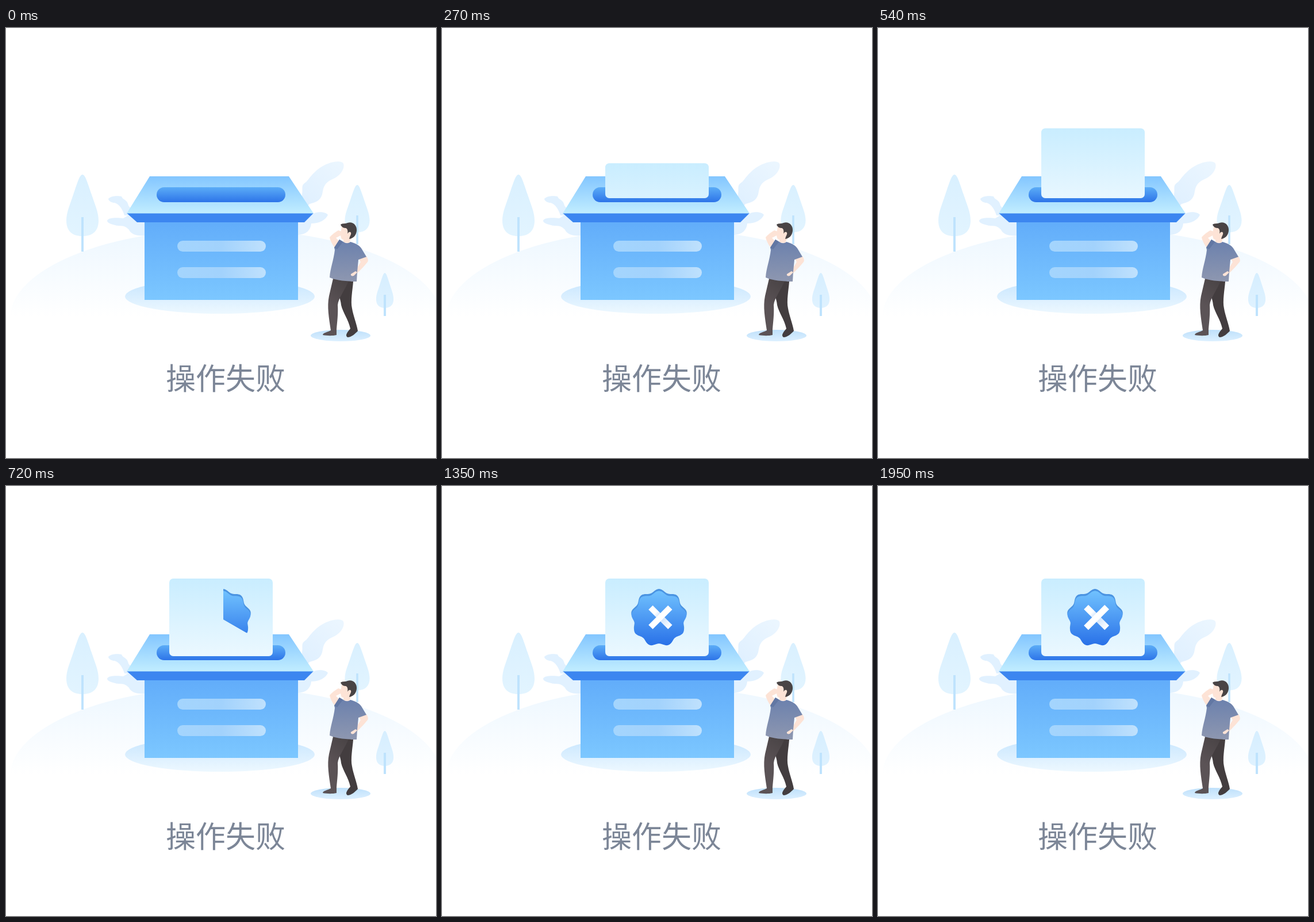
An HTML page with a canvas for the animation above (1.98 s loop, 748 by 748 pixels).

```html
<!DOCTYPE html>
<html lang="zh">
<head>
<meta charset="utf-8">
<title>操作失败</title>
<style>
html, body { margin: 0; width: 100%; height: 100%; overflow: hidden; background: #fff; }
canvas { display: block; width: 748px; height: 748px; }
</style>
</head>
<body>
<canvas id="stage" width="748" height="748"></canvas>
<script>
const ctx = document.getElementById('stage').getContext('2d');
const LOOP = 1980, STEP = 30;
const clamp = (v, a = 0, b = 1) => Math.min(b, Math.max(a, v));
const progress = (t, from, to) => clamp((t - from) / (to - from));

function grad(x0, y0, x1, y1, ...colors) {
  const g = ctx.createLinearGradient(x0, y0, x1, y1);
  colors.forEach((c, i) => g.addColorStop(i / (colors.length - 1), c));
  return g;
}
const down = (y0, y1, ...colors) => grad(0, y0, 0, y1, ...colors);

function shape(d, fill) {
  ctx.fillStyle = fill;
  ctx.fill(new Path2D(d));
}

function oval(x, y, rx, ry, fill) {
  ctx.fillStyle = fill;
  ctx.beginPath();
  ctx.ellipse(x, y, rx, ry, 0, 0, Math.PI * 2);
  ctx.fill();
}

function pill(x, y, w, h, r, fill) {
  ctx.fillStyle = fill;
  ctx.beginPath();
  ctx.roundRect(x, y, w, h, r);
  ctx.fill();
}

function tree(x, y, sx, sy, trunkTop, trunkEnd, trunkW, crown, trunk) {
  ctx.save();
  ctx.translate(x, y);
  ctx.scale(sx, sy);
  shape('M0 0C5 0 9 15 16 35C22 53 28 66 28 80C28 97 19 107 0 107' +
    'C-19 107-28 97-28 80C-28 66-22 53-16 35C-9 15-5 0 0 0Z', crown);
  ctx.restore();
  ctx.fillStyle = trunk;
  ctx.fillRect(x - trunkW / 2, trunkTop, trunkW, trunkEnd - trunkTop);
}

function scenery() {
  ctx.fillStyle = down(350, 502, '#edf7ff', '#ffffff');
  ctx.beginPath();
  ctx.ellipse(382, 505, 375, 155, 0, Math.PI, Math.PI * 2);
  ctx.fill();

  tree(133, 255, 1, 1, 329, 389, 4, down(0, 107, '#d9f0ff', '#e2f4ff'), '#bfe3fd');
  tree(611, 273, .77, .77, 326, 376, 3.5, down(0, 107, '#d9f0ff', '#e2f4ff'), '#bfe3fd');
  tree(659, 426, .54, .57, 464, 501, 4, down(0, 107, '#d6eeff', '#dff2ff'), '#bfe3fd');

  const leaf = '#e1f1ff';
  shape('M178 297C184 291 196 292 201 293C204 300 211 298 213 309L227 326H206' +
    'C202 312 194 304 187 304C182 303 178 300 178 297Z', leaf);
  shape('M176 335C178 329 196 330 204 331L214 325L241 330V361C230 362 218 360 214 351' +
    'C205 341 198 346 190 343C182 341 176 339 176 335Z', leaf);
  shape('M587 236C590 246 580 258 568 263C559 267 553 272 551 284C549 300 540 303 528 306' +
    'L515 320V290C517 278 512 274 522 268C528 262 538 244 560 236C572 231 585 231 587 236Z',
    grad(580, 235, 518, 300, '#ebf6ff', '#e0f0ff'));
  shape('M560 325C556 334 545 340 531 340C530 352 522 359 508 360V335L535 323' +
    'C540 319 556 319 560 325Z', leaf);
}

function box() {
  oval(372, 467, 165, 30, down(437, 497, '#c6e5fe', '#edf8ff'));
  ctx.fillStyle = down(338, 473, '#62adfa', '#7cc7ff');
  ctx.fillRect(241, 338, 267, 135);
  const bar = grad(298, 0, 452, 0, '#a4d5fd', '#a2d2fc', '#bfe1fd');
  pill(298, 370, 154, 19, 9.5, bar);
  pill(298, 416, 154, 19, 9.5, bar);
  shape('M210 322H535L519 338H228Z', '#3c86f0');
  shape('M250 258H492L535 322.5H210Z', down(258, 322, '#83c6ff', '#c1edff'));
  pill(262, 277, 224, 26, 13, down(277, 303, '#5bacf7', '#2d74e8'));
}

function man() {
  const skin = '#fde3d6';
  oval(582, 535, 52, 10, down(525, 545, '#bee0fb', '#dcf0ff'));
  // legs
  shape('M590 438L604 441C603 455 599 475 602 488C604 500 610 515 612 527' +
    'C607 532 601 538 594 538C590 535 592 531 599 523C596 508 586 495 583 482' +
    'C582 470 578 465 575 460Z', '#433d3f');
  shape('M569 436L596 440C590 455 578 470 577 482C578 497 576 512 575 524L575 534' +
    'C567 536 556 535 551 534C551 530 560 529 565 526C562 505 558 485 562 466Z',
    grad(590, 440, 562, 480, '#4a4446', '#5b5356'));
  // arms
  shape('M573 384C568 377 564 370 563 364C567 359 573 355 578 352L584 354L582 361' +
    'L574 365L582 374Z', skin);
  shape('M614 402L627 397C629 400 631 404 629 407C622 416 612 425 608 430' +
    'C605 432 602 432 600 430C599 427 604 425 608 422L617 407Z', skin);
  // head
  shape('M584 345L600 344L602 362L597 374L587 373L587 368C583 368 582 363 582 358Z', skin);
  shape('M582 342C586 339 590 341 594 339C604 336 611 344 610 353C609 361 604 366 597 367' +
    'C598 362 601 359 600 356C598 353 595 356 594 358C595 353 594 349 591 348' +
    'C588 348 584 347 582 342Z', '#494445');
  // shirt
  shape('M580 368L587 372C591 375 596 375 599 372C606 374 614 377 618 383L627 398' +
    'L613 403L611 424L610 441C594 441 574 439 563 434C564 418 570 404 572 386L571 382Z',
    down(368, 441, '#6a80ad', '#8e97b0'));
  shape('M580 368L586 372L576 385L571 382Z', '#6277a3');
  shape('M608 423L600 428C599 431 602 432 605 431L611 425Z', skin);
}

function wavy(x, y, r, fill) {
  ctx.beginPath();
  for (let i = 0; i < 360; i += 2) {
    const a = i * Math.PI / 180;
    const d = r + 2.7 * Math.cos(9 * a);
    ctx.lineTo(x + d * Math.sin(a), y - d * Math.cos(a));
  }
  ctx.closePath();
  ctx.fillStyle = fill;
  ctx.fill();
}

function badge(sweep) {
  if (sweep <= 0) return;
  ctx.save();
  if (sweep < 1) {
    ctx.beginPath();
    ctx.moveTo(378, 232);
    ctx.arc(378, 232, 80, -Math.PI / 2, -Math.PI / 2 + sweep * Math.PI * 2);
    ctx.clip();
  }
  wavy(377.5, 228, 46.2, '#4b94e2');
  wavy(377.5, 231, 45.8, down(183, 277, '#70c1fe', '#2971e8'));
  ctx.restore();
}

// Grows past full size, then shakes sideways and settles.
function cross(t) {
  if (t <= 1080) return;
  const grow = progress(t, 1080, 1410) * 1.15;
  const scale = grow - .15 * progress(t, 1410, 1470);
  const beat = clamp((t - 1410) / 60, 0, 9);
  const stop = k => k === 0 || k >= 9 ? 0 : k % 2 ? -20.5 : 23.5;
  const k = Math.floor(beat);
  const shift = stop(k) + (stop(k + 1) - stop(k)) * (beat - k);

  ctx.save();
  ctx.translate(376.6 + shift, 225.1);
  ctx.scale(scale, scale);
  ctx.translate(3.5, 3.5);
  ctx.rotate(Math.PI / 4);
  ctx.fillStyle = grad(-25.5, 0, 25.5, 0, '#fff', '#fff', '#c4ddfb', '#e3effd', '#fff');
  ctx.fillRect(-25.5, -5.5, 51, 11);
  ctx.fillStyle = '#fff';
  ctx.fillRect(-5.5, -25.5, 11, 51);
  ctx.restore();
}

function paper(t) {
  const h = 135 * progress(t, 0, 600);
  if (h <= 0) return;
  const top = 296 - h;
  pill(284, top, 180, h, Math.min(7, h / 2), down(top, top + 135, '#c9edff', '#ebf8ff'));
}

function caption() {
  ctx.font = '52px "Noto Sans CJK SC", "Noto Sans CJK", sans-serif';
  ctx.fillStyle = '#7c8697';
  ctx.fillText('操作失败', 278, 629);
}

function draw() {
  const t = Math.floor((performance.now() % LOOP) / STEP + .01) * STEP % LOOP;
  ctx.fillStyle = '#fff';
  ctx.fillRect(0, 0, 748, 748);
  scenery();
  box();
  paper(t);
  badge(progress(t, 630, 900));
  cross(t);
  man();
  caption();
  requestAnimationFrame(draw);
}
draw();
</script>
</body>
</html>
```
